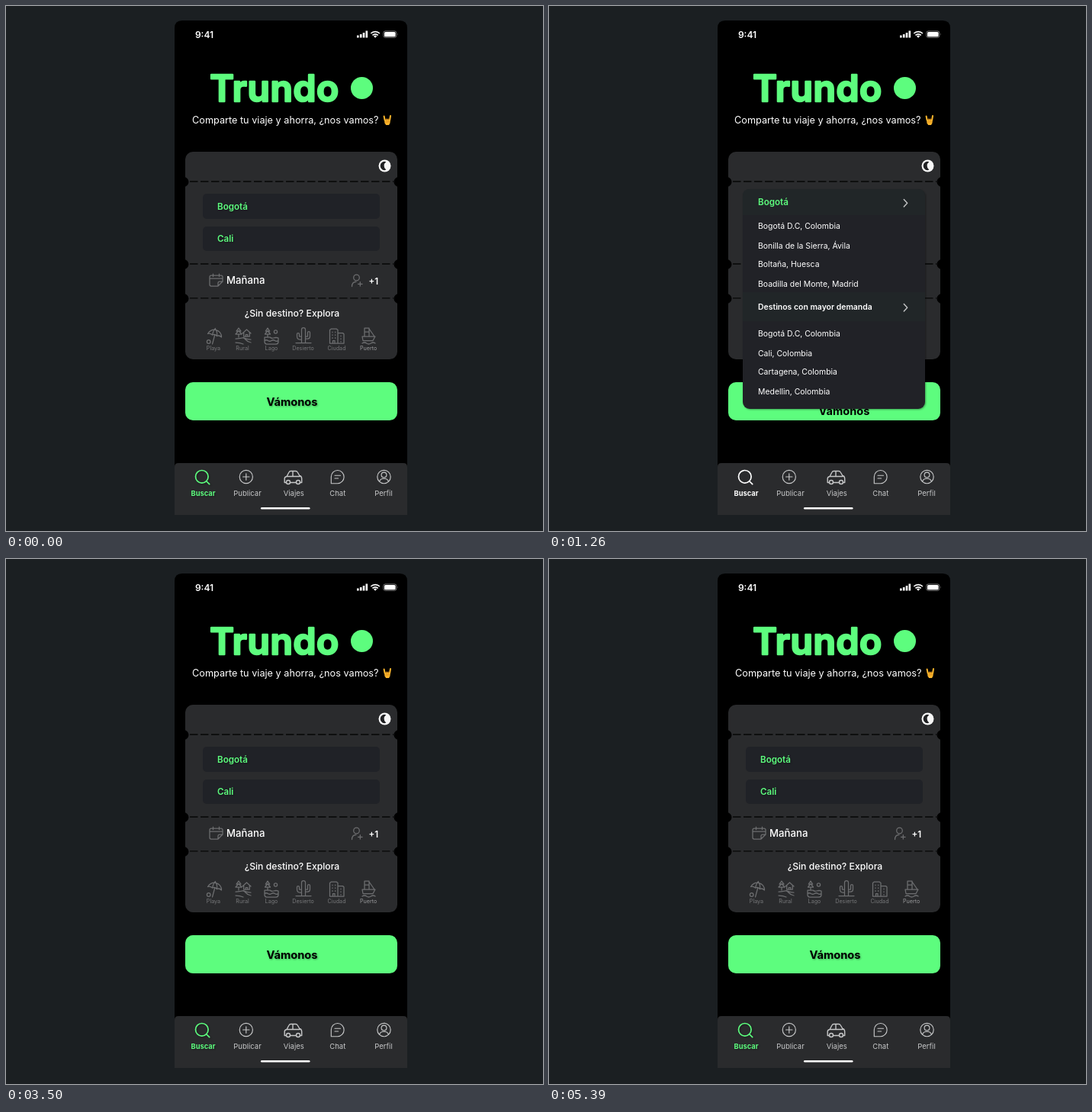
An HTML page for the animation above (5740 ms loop, 704 px wide and 688 px high).

```html
<!DOCTYPE html>
<html lang="es">
<head>
<meta charset="utf-8">
<title>Viajes compartidos</title>
<style>
  html, body { margin: 0; width: 100%; height: 100%; overflow: hidden; background: #1b1f22; }
  svg { display: block; font-family: Inter, "Open Sans", sans-serif; }

  .dark {
    --page: #000; --card: #2a2b2d; --field: #202227; --value: #5dfd7e; --text: #fff;
    --icon: #6d6e70; --label: #77787a; --harbor: #98999b; --cta: #5dfd7e;
    --nav: #2a2b2d; --navText: #c6c7c8; --active: #5dfd7e; --bar: #fff; --dash: #060606;
    --disc: #f7f7f7; --moon: #202123;
  }
  .light {
    --page: #25d07f; --card: #fff; --field: #eee; --value: #0a0a0a; --text: #0a0a0a;
    --icon: #0a0a0a; --label: #aaa; --harbor: #858585; --cta: #97e6b9;
    --nav: #97e6b9; --navText: #42684f; --active: #000; --bar: #000; --dash: #ececec;
    --disc: #ebebeb; --moon: #fafafa;
  }

  .line { fill: none; stroke: var(--icon); stroke-width: 1.25; stroke-linecap: round; stroke-linejoin: round; }
  .tab { stroke: var(--navText); stroke-width: 1.15; }
  .active { stroke: var(--active); stroke-width: 1.7; }
  .mid { text-anchor: middle; }
  .brand { font-size: 48px; font-weight: 600; letter-spacing: .6px; stroke-width: 2.6; stroke-linejoin: round; }
  .slogan { font-size: 12.7px; }
  .value { font-size: 11.6px; font-weight: 600; fill: var(--value); }
  .cta { font-size: 14.6px; font-weight: 700; }
  .label { font-size: 7.2px; fill: var(--label); }
  .nav { font-size: 9.5px; fill: var(--navText); }
  .clock { font-size: 12px; font-weight: 600; fill: #fff; }
  .item { font-size: 10.45px; fill: #fff; }
  .soft { filter: drop-shadow(1px 1px 1px rgba(0,0,0,.35)); }
  .faint { filter: drop-shadow(1px 2px 1.5px rgba(0,0,0,.14)); }

  .home, .menu, .day { animation: 5.74s step-end infinite; }
  .home { animation-name: home; }
  .menu { animation-name: menu; }
  .day { animation-name: day; }
  @keyframes home { 0% { visibility: visible } 20.73% { visibility: hidden } 42.68%, 100% { visibility: visible } }
  @keyframes menu { 0% { visibility: hidden } 20.73% { visibility: visible } 42.68%, 100% { visibility: hidden } }
  @keyframes day { 0% { visibility: hidden } 73.17% { visibility: visible } 93.9%, 100% { visibility: hidden } }
</style>
</head>
<body>
<svg width="704" height="688" viewBox="0 0 704 688">
  <defs>
    <g id="status">
      <text class="clock mid" x="260" y="42">9:41</text>
      <path fill="none" stroke="#fff" stroke-width="2.6" d="M461.3 41.5v-3M465.2 41.5v-4.6M469 41.5v-6.6M472.8 41.5v-9"/>
      <path fill="none" stroke="#fff" stroke-width="1.7" d="M478.3 36a8.2 8.2 0 0 1 11.6 0M480.5 38.4a5.1 5.1 0 0 1 7.2 0"/>
      <path fill="#fff" d="M482 39.6a3 3 0 0 1 4.2 0l-2.1 2.2z"/>
      <rect x="494.8" y="32.9" width="17" height="8.4" rx="2.4" fill="none" stroke="#fff" stroke-opacity=".45"/>
      <rect x="496" y="34" width="14.6" height="6.2" rx="1.5" fill="#fff"/>
      <path d="M513.2 35.8q1 1.2 0 2.6z" fill="#fff" opacity=".5"/>
    </g>

    <g id="horns">
      <path d="M496.6 149.5l-1-5M503.2 149l.8-5" stroke="#fbb52c" stroke-width="2" stroke-linecap="round"/>
      <path d="M496 149.2q4-2 8 0l-.6 4.2-1.4 2.6h-3.8l-1.7-2.6z" fill="#fbb52c"/>
      <path d="M498.7 147.6v2.8M501 147.6v2.8M498 152.2l4.2-.4" stroke="#d98718" stroke-width=".8" stroke-linecap="round"/>
    </g>

    <g id="moon">
      <circle cx="496.5" cy="209.5" r="8" fill="var(--disc)"/>
      <path d="M498.3 204.3a5.6 5.6 0 1 0 0 10.4a6.4 6.4 0 0 1 0-10.4z" fill="var(--moon)"/>
    </g>

    <g id="notches" fill="var(--page)">
      <circle cx="233" cy="230.5" r="6.5"/><circle cx="515" cy="230.5" r="6.5"/>
      <circle cx="233" cy="338.5" r="6.5"/><circle cx="515" cy="338.5" r="6.5"/>
      <circle cx="233" cy="383.5" r="6.5"/><circle cx="515" cy="383.5" r="6.5"/>
    </g>

    <g id="fields" fill="var(--field)">
      <rect x="258" y="246" width="232" height="33" rx="5"/>
      <rect x="258" y="289" width="232" height="32" rx="5"/>
    </g>

    <g id="trip" class="line">
      <path d="M284 361v-6q0-2-2-2h-13q-2 0-2 2v10q0 2 2 2h9zM278 367v-4q0-2 2-2h4M267 357h17M271.5 351v3.5M279.5 351v3.5"/>
      <circle cx="459.5" cy="356" r="3.8"/>
      <path d="M453.5 367.5q0-6 5.5-6.2M461.5 364.3h5.6M464.3 361.5v5.6"/>
    </g>

    <g id="explore">
      <g class="line">
        <path d="M264.5 429.5a9.5 9.5 0 0 1 18 4.5q-3-3-6-1.5q-2.5-3-6-1.5q-3-2.500-6-1.500zM270.500 431c1-4 2-7 4-8.500M276.500 432.500c.5-4 0-7-2-9M273.500 432l-3 11"/>
        <circle cx="265.700" cy="440" r="2.300"/>
        <path d="M305 422l-3 4h6zM305 425.500l-4 4.500h8zM305 430v4M310 429l5.500-5 5.500 5M311.700 428v5h7.600v-5M314.300 433v-2.500h2.500v2.500M301 436c8 0 9-3 13 1q3 3.500 7 4M301 441q6 0 10 2M311 434.500q5 2.500 10 2.500"/>
        <path d="M343 422l-2.700 4h5.400zM343 425.500l-3.500 4.500h7zM343 430v4M339 434h7q2 2 5 1t6 0v5q0 3-3 3h-12q-3 0-3-3zM339 438.500q2.300-1.500 4.500 0t4.500 0 4.500 0 4.500 0"/>
        <circle cx="353.500" cy="427" r="2.100"/>
        <path d="M387.500 441v-17a2.500 2.500 0 0 1 5 0v17M387.500 437h-2q-4 0-4-4v-3a1.500 1.500 0 0 1 3 0v3h3M392.500 433h3v-5a1.500 1.500 0 0 1 3 0v5q0 3-3 3h-3M380 441.500h20"/>
        <path d="M424.500 442v-17.500l2-1.500h6.500l2 1.500v17.500zM435 428.500h6.500l1.500 1.500v12h-8M428.500 442v-3.500h2.500v3.500"/>
        <path d="M428 427v9M431.700 427v9M439 432v8" stroke-dasharray=".8 3"/>
        <path d="M470 433v-11h6v11M476 423l7 10M470 427h6M467 433h17l-3 5.500h-13zM467 442q3-2 5.700 0t5.700 0 5.700 0"/>
      </g>
      <g class="label mid">
        <text x="272" y="451">Playa</text>
        <text x="310" y="451">Rural</text>
        <text x="348" y="451">Lago</text>
        <text x="389.500" y="451">Desierto</text>
        <text x="433.500" y="451">Ciudad</text>
        <text x="475.200" y="451" fill="var(--harbor)">Puerto</text>
      </g>
    </g>

    <g id="search">
      <g class="line active"><circle cx="256.800" cy="616.800" r="8.300"/><path d="M263 623l3.700 3.700"/></g>
      <text class="mid" x="258.500" y="642" font-size="9.300" font-weight="700" fill="var(--active)">Buscar</text>
    </g>

    <g id="tabs">
      <g class="line tab">
        <circle cx="314.800" cy="617" r="8.600"/><path d="M314.800 612.800v8.400M310.600 617h8.400"/>
        <g stroke-width="1.400">
          <path d="M367.500 624.500h-2.300v-5q0-2.500 2.800-3l3-5.500q.7-1.500 2.300-1.500h6.500q1.600 0 2.400 1.500l2.700 4.500q2.800.6 2.800 4v5h-2.300M372.500 624.500h8M368 616.500h17M376 609.500v6.500"/>
          <circle cx="370" cy="624" r="2.500"/><circle cx="383" cy="624" r="2.500"/>
        </g>
        <path d="M426.300 625.700v-8.700a8.400 8.600 0 1 1 8.400 8.700zM431 615.200h7.500M431 619h4.600"/>
        <circle cx="495.500" cy="617" r="8.700"/><circle cx="495.500" cy="614.500" r="3.400"/><path d="M489.500 623q1.500-3.800 6-3.800t6 3.800"/>
      </g>
      <g class="nav mid">
        <text x="316.500" y="642">Publicar</text>
        <text x="377.300" y="642">Viajes</text>
        <text x="434.800" y="642">Chat</text>
        <text x="495" y="642">Perfil</text>
      </g>
      <rect x="334" y="657" width="64.500" height="2.500" rx="1.250" fill="var(--bar)"/>
    </g>

    <g id="slogan">
      <text class="slogan" x="244" y="154">Comparte tu viaje y ahorra, ¿nos vamos?</text>
      <use href="#horns"/>
    </g>

    <path id="chevron" d="M465.300 253.500l4.400 4.700-4.400 4.700" fill="none" stroke="#c4c5c6" stroke-width="1.400" stroke-linecap="round" stroke-linejoin="round"/>
  </defs>

  <rect width="704" height="688" fill="#1b1f22"/>

  <g class="dark">
    <path d="M221 667V29q0-10 10-10h285q10 0 10 10v638z"/>
    <use href="#status"/>
    <text class="brand mid" x="352" y="125" fill="#5dfd7e" stroke="#5dfd7e">Trundo</text>
    <circle cx="466.500" cy="107.500" r="14.500" fill="#5dfd7e"/>
    <rect x="235" y="191" width="278" height="272" rx="10" fill="var(--card)"/>
    <path d="M241 230h267M241 338h267M241 382.800h267" stroke="var(--dash)" stroke-width="1.300" stroke-dasharray="10.500 3.500"/>
    <use href="#notches"/>
    <use href="#moon"/>
    <rect x="235" y="493" width="278" height="50" rx="10" fill="var(--cta)"/>
    <path d="M221 667v-63q0-5 5-5h295q5 0 5 5v63z" fill="var(--nav)"/>
    <use href="#tabs"/>

    <g class="home">
      <use href="#slogan" fill="#fff"/>
      <use href="#fields"/>
      <g class="value soft"><text x="277" y="267">Bogotá</text><text x="277" y="308.500">Cali</text></g>
      <use href="#trip"/>
      <g fill="#fff" font-weight="500">
        <text x="289" y="364" font-size="13.200">Mañana</text>
        <text x="475.500" y="364.500" font-size="11.600" font-weight="600">+1</text>
        <text class="mid" x="375" y="407" font-size="12.200">¿Sin destino? Explora</text>
      </g>
      <use href="#explore"/>
      <text class="cta mid soft" x="375" y="524">Vámonos</text>
      <use href="#search" class="soft"/>
    </g>

    <g class="menu" style="--active: #fff">
      <use href="#slogan" x="-1" fill="#fff"/>
      <text class="cta mid" x="387" y="536">Vámonos</text>
      <rect class="soft" x="254" y="240" width="239" height="288" rx="9" fill="#212227"/>
      <path d="M254 274v-25q0-9 9-9h221q9 0 9 9v25zM254 375h239v38h-239z" fill="#212628"/>
      <text class="value" x="274" y="261">Bogotá</text>
      <use href="#chevron"/>
      <use href="#chevron" y="137"/>
      <g class="item">
        <text x="274" y="291.800">Bogotá D.C, Colombia</text>
        <text x="274" y="318">Bonilla de la Sierra, Ávila</text>
        <text x="274" y="342.300">Boltaña, Huesca</text>
        <text x="274" y="367.800">Boadilla del Monte, Madrid</text>
        <text x="274" y="398" font-weight="600">Destinos con mayor demanda</text>
        <text x="274" y="432.800">Bogotá D.C, Colombia</text>
        <text x="274" y="459">Cali, Colombia</text>
        <text x="274" y="483.300">Cartagena, Colombia</text>
        <text x="274" y="508.800">Medellin, Colombia</text>
      </g>
      <use href="#search"/>
    </g>
  </g>

  <g class="light day">
    <rect x="221" y="19" width="305" height="60"/>
    <use href="#status" x="-1"/>
    <path d="M221 667V61q0-10 10-10h285q10 0 10 10v606z" fill="var(--page)"/>
    <g class="faint" fill="#fff">
      <text class="brand mid" x="353" y="128" stroke="#fff">Trundo</text>
      <circle cx="466.500" cy="110" r="14.500"/>
    </g>
    <use href="#slogan" x="2.500" fill="#fff" opacity=".84"/>
    <g class="faint">
      <rect x="236" y="191" width="278" height="272" rx="10" fill="var(--card)"/>
    </g>
    <path d="M236 382h278v71q0 10-10 10h-258q-10 0-10-10z" fill="#f4f4f4"/>
    <path d="M242 230h267M242 338h267" stroke="var(--dash)" stroke-dasharray="5 3"/>
    <use href="#notches" x="1"/>
    <use href="#moon" y="-.5"/>
    <use href="#fields" x="1.200"/>
    <g class="value"><text x="278" y="266">Bogotá</text><text x="278" y="308.500">Cali</text></g>
    <use href="#trip" x="1"/>
    <g fill="var(--text)" font-weight="500">
      <text class="mid" x="370.800" y="215" font-size="11.300">¿Nos vamos?</text>
      <text x="296" y="363" font-size="12">Mañana</text>
      <text x="477" y="363" font-size="11">+1</text>
      <text class="mid" x="373.300" y="405" font-size="11.300">¿Sin destino? Explora</text>
    </g>
    <use href="#explore" x="1"/>
    <rect x="236" y="493" width="278" height="50" rx="10" fill="var(--cta)" class="faint"/>
    <text class="cta mid" x="376" y="524">Vámonos</text>
    <path d="M221 667v-58q0-10 10-10h285q10 0 10 10v58z" fill="var(--nav)"/>
    <use href="#tabs"/>
    <use href="#search"/>
  </g>
</svg>
</body>
</html>
```
